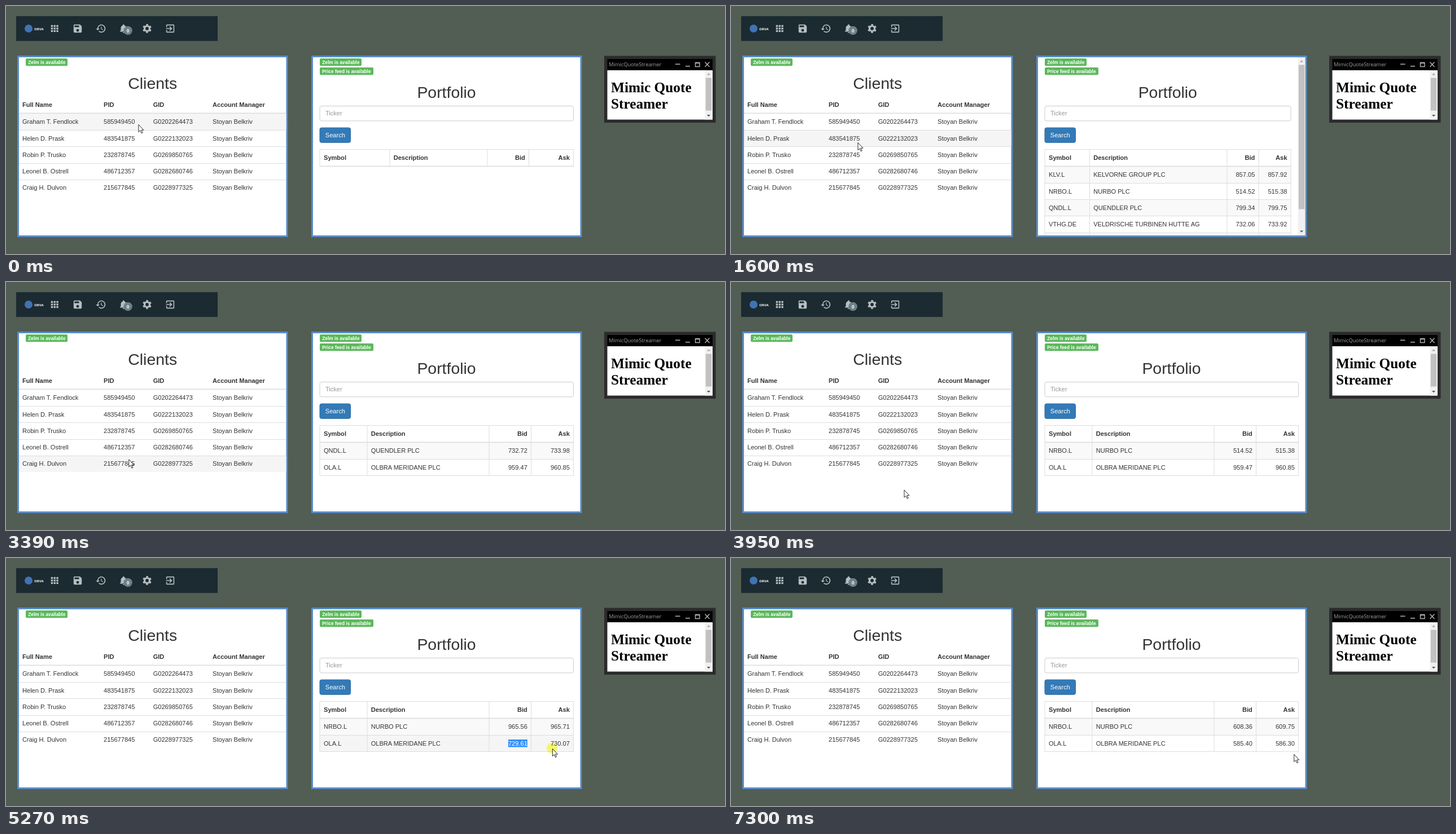
An HTML page that plays this animation: 1274x440 px, repeating every 7.39 s.

```html
<!DOCTYPE html>
<html lang="en">
<head>
<meta charset="utf-8">
<title>Clients and portfolio</title>
<style>
html, body { margin: 0; width: 100%; height: 100%; overflow: hidden; background: #525d53; }
svg { display: block; }
text { font: 11.07px "Liberation Sans", Arial, sans-serif; fill: #333; white-space: pre; }
.b { font-weight: bold; }
.r { text-anchor: end; }
.m { text-anchor: middle; }
.h1 { font-size: 28.4px; text-anchor: middle; }
.tag { font-size: 8.3px; font-weight: bold; fill: #fff; }
.serif { font: bold 25.3px "Liberation Serif", Times, serif; fill: #000; }
.ui { font: 9.3px "Open Sans", sans-serif; fill: #a0a0a0; }
.icon { fill: #b6bfc1; }
.btn { fill: none; stroke: #b4b4b4; stroke-width: 1.4; }
.frame { fill: #fff; stroke: #5b8cc8; stroke-width: 3; }
#spot { mix-blend-mode: multiply; }
</style>
</head>
<body>
<svg width="1274" height="440" viewBox="0 0 1274 440">
  <defs>
    <clipPath id="pane"><rect x="544" y="91" width="473.5" height="316"/></clipPath>
  </defs>
  <rect width="1274" height="440" fill="#525d53"/>

  <!-- toolbar -->
  <rect x="18" y="18" width="357" height="44" fill="#1c2b31"/>
  <circle cx="40" cy="40" r="7" fill="#3f73b5"/>
  <text x="50" y="43" style="font:bold 6px 'Open Sans',sans-serif;fill:#fff">ORVA</text>
  <g class="icon">
    <g id="grid"></g>
    <path transform="translate(117.4 30.4) scale(.8)" d="M17 3H5c-1.1 0-2 .9-2 2v14c0 1.1.9 2 2 2h14c1.1 0 2-.9 2-2V7zm-5 16a3 3 0 1 1 0-6 3 3 0 0 1 0 6zm3-10H5V5h10z"/>
    <path transform="translate(158.6 30.4) scale(.8)" d="M13 3a9 9 0 0 0-9 9H1l4 4 4-4H6a7 7 0 1 1 2.06 4.94l-1.42 1.42A9 9 0 1 0 13 3zm-1 5v5l4.28 2.54.72-1.21-3.5-2.08V8z"/>
    <path transform="translate(198.7 30.4) scale(.8)" d="M12 22a2 2 0 0 0 2-2h-4a2 2 0 0 0 2 2zm6-6v-5c0-3.07-1.64-5.64-4.5-6.32V4a1.5 1.5 0 0 0-3 0v.68C7.63 5.36 6 7.92 6 11v5l-2 2v1h16v-1z"/>
    <path transform="translate(281.4 30.4) scale(.8)" d="M10.1 15.6L11.5 17l5-5-5-5-1.4 1.4 2.6 2.6H3v2h9.7zM19 3H5c-1.1 0-2 .9-2 2v4h2V5h14v14H5v-4H3v4c0 1.1.9 2 2 2h14c1.1 0 2-.9 2-2V5c0-1.1-.9-2-2-2z"/>
  </g>
  <g fill="none" stroke="#b6bfc1" transform="translate(250 40) rotate(90)">
    <circle r="4.5" stroke-width="3.2"/>
    <circle r="6.7" stroke-width="2.4" stroke-dasharray="3.6 3.416" stroke-dashoffset="1.8"/>
  </g>
  <circle cx="216" cy="43.5" r="7.8" fill="#708089"/>
  <text class="b m" x="216" y="46.6" style="font-size:8.5px;fill:#fff">0</text>

  <!-- clients -->
  <rect class="frame" x="21.5" y="89.5" width="476.4" height="319"/>
  <rect x="35" y="93" width="74" height="13.3" rx="2" fill="#5cb85c"/>
  <text class="tag" x="39.3" y="102.8">Zelm is available</text>
  <text class="h1" x="259.7" y="147.1">Clients</text>
  <rect id="hover" x="23" width="473.4" height="29" fill="#f5f5f5"/>
  <g id="clients"></g>

  <!-- portfolio -->
  <rect class="frame" x="542.5" y="89.5" width="476.4" height="319"/>
  <rect x="556" y="93" width="74" height="13.3" rx="2" fill="#5cb85c"/>
  <text class="tag" x="560.3" y="102.8">Zelm is available</text>
  <rect x="556" y="109" width="95" height="13.3" rx="2" fill="#5cb85c"/>
  <text class="tag" x="560.3" y="118.6">Price feed is available</text>
  <g id="portfolio" clip-path="url(#pane)"></g>
  <rect x="556" y="216" width="54.5" height="26.3" rx="3" fill="#337ab7" stroke="#2e6da4"/>
  <text class="m" x="583.3" y="233" style="fill:#fff">Search</text>

  <!-- publisher window -->
  <rect x="1060" y="88.5" width="197.5" height="118.5" fill="#2b2b2c"/>
  <rect x="1065.5" y="94" width="186.5" height="20" fill="#000"/>
  <rect x="1065.5" y="114" width="186.5" height="87.5" fill="#fff"/>
  <text class="ui" x="1068" y="107.2">MimicQuoteStreamer</text>
  <path class="btn" d="M1186 103.3h8.5M1204 106.7h8M1221.5 100.5h7.5v7h-7.5zM1221 101.3h8.5M1238.5 99.5l8 8.5M1246.5 99.5l-8 8.5"/>
  <text class="serif" x="1072" y="153">Mimic Quote</text>
  <text class="serif" x="1072" y="182.2">Streamer</text>
  <g id="bar"></g>

  <circle id="spot" cx="-.5" cy="-.5" r="9.5" fill="#ffff70"/>
  <path id="cursor" d="M.4.4v13.2l3-2.8 2.2 4.9 2-.9-2.2-4.7h4z" fill="#fff" stroke="#111" stroke-width=".9"/>
</svg>
<script>
const LOOP = 7390, ROW = 29.25;
const $ = id => document.getElementById(id);
const text = (x, y, str, cls = '') => `<text class="${cls}" x="${x}" y="${y}">${str}</text>`;
const box = (x, y, w, h, fill = '#ddd') => `<rect x="${x}" y="${y}" width="${w}" height="${h}" fill="${fill}"/>`;

function scrollbar(x, y, h, thumbH) {
  const c = x + 6.5, end = y + h;
  return box(x, y, 13, h, '#f1f1f1') + box(x + 1.3, y + 13.5, 10.4, thumbH, '#c1c1c1') +
    `<path d="M${c - 3} ${y + 8.5}h6l-3-3.2z" fill="#a3a3a3"/>` +
    `<path d="M${c - 3} ${end - 8.5}h6l-3 3.2z" fill="#505050"/>`;
}

// Fixed parts
let cells = '';
for (let i = 0; i < 9; i++) cells += box(79.7 + i % 3 * 4.8, 33.8 + (i / 3 | 0) * 4.5, 3.4, 3.3, '#b6bfc1');
$('grid').innerHTML = cells;
$('bar').innerHTML = scrollbar(1238.5, 114, 87.5, 58);

const people = [
  ['Graham T. Fendlock', '585949450', 'G0202264473'],
  ['Helen D. Prask', '483541875', 'G0222132023'],
  ['Robin P. Trusko', '232878745', 'G0269850765'],
  ['Leonel B. Ostrell', '486712357', 'G0282680746'],
  ['Craig H. Dulvon', '215677845', 'G0228977325']
];
const clientX = [29, 173, 260.7, 366];
const clientRow = (vals, y, cls) => vals.map((v, i) => text(clientX[i], y, v, cls)).join('');
$('clients').innerHTML = box(23, 189.5, 473.4, 1.6) +
  clientRow(['Full Name', 'PID', 'GID', 'Account Manager'], 179.3, 'b') +
  people.map((p, i) => (i ? box(23, Math.round(190.8 + ROW * i), 473.4, 1) : '') +
    clientRow([...p, 'Stoyan Belkriv'], 209.4 + ROW * i)).join('');

// Portfolio: column edges per layout, stocks per client
const stock = {
  klv: ['KLV.L', 'KELVORNE GROUP PLC'],
  nrb: ['NRBO.L', 'NURBO PLC'],
  qnd: ['QNDL.L', 'QUENDLER PLC'],
  vth: ['VTHG.DE', 'VELDRISCHE TURBINEN HUTTE AG'],
  ola: ['OLA.L', 'OLBRA MERIDANE PLC']
};
const none = { edges: [680, 853, 926.5, 1005.5], rows: [] };
const first = { edges: [635.5, 879, 935, 992], rows: ['klv', 'nrb', 'qnd', 'vth', 'ola'], scroll: true };
const pair = (...rows) => ({ edges: [640, 856, 930.5, 1005.5], rows });
const third = pair('qnd', 'ola'), fifth = pair('nrb', 'ola');

// [time, view, bid/ask pairs]
const states = [
  [0, none, ''],
  [990, first, '641.18 642.02 702.35 703.11 588.47 589.30 915.72 916.84'],
  [1050, first, '690.27 691.15 837.40 838.06 561.93 562.71 648.59 650.02'],
  [1370, first, '857.05 857.92 514.52 515.38 799.34 799.75 732.06 733.92'],
  [2310, third, '799.34 799.75 618.24 619.07'],
  [2390, third, '856.13 857.44 683.90 684.55'],
  [3390, third, '732.72 733.98 959.47 960.85'],
  [3920, fifth, '514.52 515.38 959.47 960.85'],
  [4400, fifth, '965.56 965.71 729.61 730.07'],
  [5410, fifth, '662.30 662.72 774.85 775.32'],
  [6410, fifth, '608.36 609.75 841.22 842.17'],
  [7300, fifth, '608.36 609.75 585.40 586.30']
];

function drawPortfolio([, view, prices], hot, picked) {
  const [a, b, c, d] = view.edges, n = view.rows.length, val = prices.split(' ');
  const line = i => Math.round(284.6 + ROW * i);
  const bottom = n ? line(n) : 284;
  let out = text((d + 555.5) / 2, 163.1, 'Portfolio', 'h1') +
    `<rect x="556" y="177.5" width="${d - 556}" height="26.3" rx="3" fill="#fff" stroke="#ccc"/>` +
    `<text x="566" y="194.2" style="fill:#999">Ticker</text>`;
  view.rows.forEach((_, i) => {
    const fill = i === hot ? '#f5f5f5' : i % 2 ? '#fff' : '#f9f9f9';
    out += box(556, line(i), d - 556, 30, fill);
  });
  out += box(555.5, 254, d - 555, 1) + box(555.5, 283.6, d - 555, 1.6);
  view.rows.forEach((_, i) => out += box(555.5, line(i + 1), d - 555, 1));
  [556, a, b, c, d].forEach(x => out += box(x - .5, 254, 1, bottom - 254 + 1));
  const row = (vals, y, cls = '') => text(563, y, vals[0], cls) + text(a + 6.7, y, vals[1], cls) +
    text(c - 6.7, y, vals[2] || '', cls + ' r') + text(d - 6.7, y, vals[3] || '', cls + ' r');
  out += row(['Symbol', 'Description', 'Bid', 'Ask'], 273.3, 'b');
  view.rows.forEach((key, i) => {
    let bid = val[2 * i];
    if (picked && i === 1) {
      // Digits are .556em wide, the point is half of that
      const w = (picked - (picked > 3 ? .5 : 0)) * 6.155;
      out += box(889.9, 322, w, 13.5, '#3390ff');
      bid = `<tspan fill="#fff">${bid.slice(0, picked)}</tspan>${bid.slice(picked)}`;
    }
    out += row([...stock[key], bid, val[2 * i + 1]], 303.4 + ROW * i);
  });
  if (view.scroll) out += scrollbar(1004.5, 91, 316, 256);
  return out;
}

// Pointer path: time, x, y
const path = [
  [0, 234.5, 210], [1290, 234.5, 210], [1602, 224.5, 242], [1914, 227, 258], [3070, 227, 258],
  [3382, 217.3, 314.5], [3844, 217.3, 314.5], [3960, 350, 395], [4080, 560, 430], [4200, 760, 405],
  [4312, 876.5, 331], [4478, 876.5, 331], [4700, 889, 334], [4870, 889, 334], [5260, 968, 338],
  [5572, 987.5, 333], [5640, 989, 333], [5728, 993, 334], [5900, 993, 334], [6134, 1006, 333],
  [6280, 1006, 333], [6600, 996.5, 347.5]
];
const nudges = [[6750, 997.3, 348], [7060, 996.5, 347.5], [7140, 997.3, 348]];
const bursts = [0, 1290, 3070, 3610, 4400, 4870, 5900];
const presses = [[520, 690], [1990, 2220], [3610, 3770], [4870, 6290]];
const latest = (list, t, time = v => v[0]) => list.filter(v => time(v) <= t).pop();

function pointer(t) {
  const nudge = latest(nudges, t);
  if (nudge) return nudge.slice(1);
  // The pointer is redrawn every 78 ms within a burst
  const s = latest(bursts, t, v => v);
  const q = s + Math.floor((t - s + 4) / 78) * 78;
  const i = path.findIndex(p => p[0] > q);
  if (i < 0) return path[path.length - 1].slice(1);
  const [t0, x0, y0] = path[i - 1], [t1, x1, y1] = path[i], k = (q - t0) / (t1 - t0);
  return [x0 + (x1 - x0) * k, y0 + (y1 - y0) * k];
}

let shown = '';
function render() {
  const t = performance.now() % LOOP, [x, y] = pointer(t);
  const at = `translate(${x} ${y})`;
  $('cursor').setAttribute('transform', at);
  $('spot').setAttribute('transform', at);
  $('spot').style.display = presses.some(([on, off]) => t >= on && t < off) ? '' : 'none';

  const client = Math.floor((y - 191) / ROW);
  $('hover').style.display = x < 497 && client >= 0 && client < 5 ? '' : 'none';
  $('hover').setAttribute('y', 191 + client * ROW);

  const state = latest(states, t);
  const hot = x > 556 && x < 1005 ? Math.floor((y - 285) / ROW) : -1;
  const picked = t >= 4870 && t < 5410 ? Math.max(0, Math.min(6, Math.round((x - 890) / 5.7))) : 0;
  const key = [state[0], hot, picked].join();
  if (key !== shown) {
    $('portfolio').innerHTML = drawPortfolio(state, hot, picked);
    shown = key;
  }
  requestAnimationFrame(render);
}
render();
</script>
</body>
</html>
```
